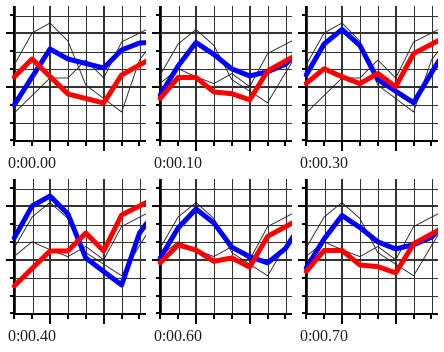
A matplotlib script for the animation above (0.8 s loop, 140 by 145 pixels).

```python
import matplotlib.pyplot as plt
import numpy as np
from matplotlib.animation import FuncAnimation

WIDTH, HEIGHT, DPI = 140, 145, 100
PX = 72 / DPI
LEFT, BOTTOM, STEP = 8.2, 134.5, 17.9
FRAMES = 8
LAST_POSE = FRAMES // 2

column = np.arange(9)
x = LEFT + STEP * column


def polyline(*corners):
    """Heights at every grid column from a few (column, y) corners."""
    return np.interp(column, *zip(*corners))


blue_start = polyline((0, 99), (2, 43), (3, 53), (5, 62), (6, 44), (7, 37), (8, 36))
blue_end = polyline((0, 59), (1, 27), (2, 17), (3, 35), (4, 79), (6, 106), (7, 54), (8, 30))
red_start = polyline((0, 71), (1, 53), (3, 88), (5, 97), (6, 69), (8, 49))
red_end = polyline((0, 107), (2, 72), (3, 72), (4, 54), (5, 72), (6, 36), (8, 18))


def blend(start, end, amount):
    return start + (end - start) * amount


def blue_heights(pose):
    s = pose / LAST_POSE
    sag = 24 * np.exp(-(column - 7.0) ** 2) * np.sin(np.pi * s)
    return blend(blue_start, blue_end, s) + sag


def red_heights(pose):
    s = pose / LAST_POSE
    swing = 17 * np.exp(-(column / 1.5) ** 4) * np.sin(2 * np.pi * s)
    return blend(red_start, red_end, s ** 1.5) + swing


fig = plt.figure(figsize=(WIDTH / DPI, HEIGHT / DPI), dpi=DPI, facecolor="white")
ax = fig.add_axes([0, 0, 1, 1])
ax.set(xlim=(0, WIDTH), ylim=(HEIGHT, 0))
ax.axis("off")


def rule(xs, ys, width=1, color="#333333"):
    ax.plot(xs, ys, color=color, lw=width * PX, antialiased=False,
            solid_capstyle="butt", zorder=1)


def pixel_center(value, width):
    return round(value) if width == 2 else np.floor(value) + 0.5


for i in range(8):
    # Every third grid line is heavier and has a longer tick.
    major_x, major_y = i % 3 == 2, i > 0 and i % 3 == 0
    grid_x = pixel_center(LEFT + STEP * i, 1 + major_x)
    grid_y = pixel_center(BOTTOM - STEP * i, 1 + major_y)
    rule([grid_x, grid_x], [0, BOTTOM], 1 + major_x)
    rule([LEFT, WIDTH], [grid_y, grid_y], 1 + major_y)

    tick_x = round(LEFT + STEP * i)
    tick_y = round(BOTTOM - STEP * i)
    rule([tick_x, tick_x], [BOTTOM, BOTTOM + (10 if major_x else 5)], 2, "black")
    rule([LEFT - (9 if major_y else 4), LEFT], [tick_y, tick_y], 2, "black")

rule([8, 8], [0, 136], 2, "black")
rule([7, WIDTH], [135, 135], 2, "black")


def curve_line(color, width, zorder):
    return ax.plot([], [], color=color, lw=width * PX, zorder=zorder,
                   solid_capstyle="round", solid_joinstyle="round")[0]


blue_ghost, red_ghost = (curve_line("#222222", 0.9, 2) for _ in range(2))
blue_line = curve_line("#0000ff", 5, 3)
red_line = curve_line("#ff0000", 5, 4)


def update(frame):
    pose = min(frame, FRAMES - frame)
    ghost_pose = LAST_POSE if pose % 3 == 0 else LAST_POSE - 1
    blue_line.set_data(x, blue_heights(pose))
    red_line.set_data(x, red_heights(pose))
    blue_ghost.set_data(x, blue_heights(ghost_pose))
    red_ghost.set_data(x, red_heights(ghost_pose))
    return blue_ghost, red_ghost, blue_line, red_line


anim = FuncAnimation(fig, update, frames=FRAMES, interval=100, repeat=True, repeat_delay=0)
plt.show()
```
